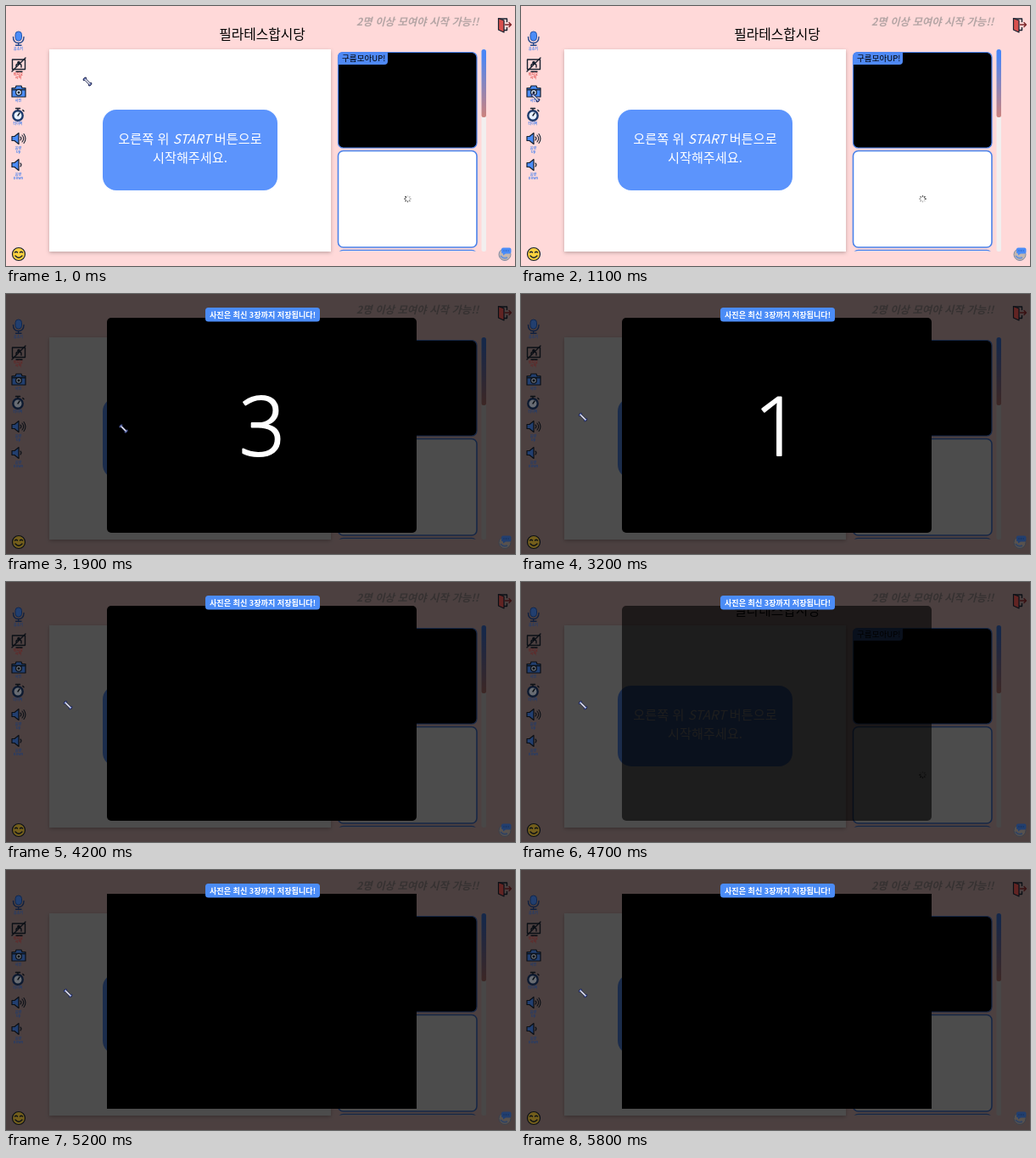
Recreate the animation shown at these times as an HTML page. Size 600 by 306 pixels, loop 6600 ms.

```html
<!DOCTYPE html>
<html lang="ko">
<head>
<meta charset="utf-8">
<style>
  html, body { margin: 0; width: 100%; height: 100%; overflow: hidden; background: #ffd9d9; }
  svg { display: block; width: 100%; height: 100%; }
  text { font-family: "Noto Sans CJK KR", "Noto Sans CJK", sans-serif; }
  .light, .light text { font-family: "Noto Sans CJK KR Light", "Noto Sans CJK KR", sans-serif; font-weight: 300; }
  .mid { text-anchor: middle; }
  .tiny { font-size: 4px; font-weight: 700; fill: #4b83ee; text-anchor: middle; }
  .red { fill: #e2504f; }
  .line { fill: none; stroke: #17212f; stroke-width: 1.4; stroke-linecap: round; stroke-linejoin: round; }
  .ink { stroke: #17212f; stroke-width: 1.2; stroke-linejoin: round; }
  .blue { fill: #4b8cf7; }
  .card { stroke: #4a82ea; stroke-width: 1.6; }
  #count { font: 300 95px "Open Sans", "Noto Sans", sans-serif; fill: #fff; stroke: #fff; stroke-width: 2; stroke-linejoin: round; }
</style>
</head>
<body>
<svg viewBox="0 0 600 306">
  <defs>
    <linearGradient id="thumb" x2="0" y2="1">
      <stop offset=".1" stop-color="#4b86f5"/>
      <stop offset="1" stop-color="#cd827c"/>
    </linearGradient>
    <filter id="shadow" x="-5%" y="-5%" width="110%" height="112%">
      <feDropShadow dx="0" dy="1.5" stdDeviation="2" flood-opacity=".25"/>
    </filter>
    <clipPath id="listClip"><rect x="388" y="50" width="172" height="238.5"/></clipPath>
  </defs>

  <rect width="600" height="306" fill="#ffd9d9"/>
  <text class="light mid" x="302" y="39" font-size="15.8">필라테스합시당</text>
  <text x="413" y="23" font-size="12.4" font-weight="700" font-style="italic" fill="#b5a5a5">2명 이상 모여야 시작 가능!!</text>

  <rect x="51" y="51" width="332" height="238" fill="#fff" filter="url(#shadow)"/>
  <rect x="114" y="122" width="206" height="95" rx="16" fill="#5c94fc"/>
  <g class="light mid" font-size="15.2" fill="#fff">
    <text x="217" y="161.5">오른쪽 위 <tspan font-style="italic">START</tspan> 버튼으로</text>
    <text x="217" y="183.5">시작해주세요.</text>
  </g>

  <g clip-path="url(#listClip)">
    <rect class="card" x="391.5" y="54.5" width="163.5" height="112.5" rx="6" style="stroke-width:1.2"/>
    <path d="M391 69V60q0-6 6-6H450V65q0 4-4 4Z" fill="#4f89f5"/>
    <text x="396" y="65" font-size="9.6">구름모아UP!</text>
    <rect class="card" x="391.5" y="170.5" width="163.5" height="113.5" rx="6" fill="#fff"/>
    <rect class="card" x="391.5" y="287.5" width="163.5" height="113" rx="6" fill="#fff"/>
  </g>
  <g id="spinner" stroke="#222" stroke-width="1.3"></g>
  <rect x="560.5" y="51" width="5.5" height="238" rx="2.5" fill="#f2efef"/>
  <rect x="560.5" y="51" width="5.5" height="80" rx="2.5" fill="url(#thumb)"/>

  <rect id="dim" width="600" height="306" opacity=".7"/>

  <g id="icons">
    <!-- microphone -->
    <rect class="blue" x="11" y="30" width="7.5" height="11" rx="3.7" stroke="#2457ad"/>
    <path class="line" style="stroke:#24488c" d="M8.5 36.5q0 7 6.200 7T21 36.500M14.700 43.500v3M11.500 46.300h6.500"/>
    <text class="tiny" x="14.500" y="51.500">음소거</text>
    <!-- video off -->
    <rect class="line" x="7.500" y="63" width="15" height="11.500"/>
    <path class="line" d="M7 77L23 61M12 77.200h7M12 72v-2q0-2 3-2t3 2v2"/>
    <circle cx="15" cy="66.500" r="1.800" fill="#17212f"/>
    <text class="tiny red" x="14.500" y="81.500">비디오</text>
    <text class="tiny red" x="14.500" y="86">시작</text>
    <!-- camera -->
    <path class="blue ink" d="M7 96.500h4l1-2.500h6l1 2.500h4V107H7Z"/>
    <path class="line" d="M7.500 98.500h15"/>
    <circle class="ink" cx="15" cy="101.700" r="3.400" fill="#dbe9ff"/>
    <circle cx="15" cy="101.700" r="1.500" fill="#17212f"/>
    <text class="tiny" x="14.500" y="113">사진</text>
    <!-- stopwatch -->
    <circle cx="14" cy="129" r="5.700" fill="#e8f1ff" stroke="#1d3a6b" stroke-width="2.400"/>
    <path class="line" d="M14 129l2-3M11.500 120.500h5M14 121v1.500M19.800 122.500l1.200 1.200"/>
    <text class="tiny" x="14" y="140">타이머</text>
    <!-- volume -->
    <path id="speaker" class="blue ink" d="M7 153.500h3l5-4v13l-5-4H7Z"/>
    <path class="line" style="stroke-width:1.100" d="M17 154q2 2 0 4M19 152q3.500 4 0 8M21 150.500q4 5.500 0 11"/>
    <text class="tiny" x="14.500" y="169">음량</text>
    <text class="tiny" x="14.500" y="173">Up</text>
    <use href="#speaker" y="31"/>
    <path class="line" style="stroke-width:1.100" d="M17 185q2 2 0 4"/>
    <text class="tiny" x="14.500" y="199.500">음량</text>
    <text class="tiny" x="14.500" y="204">Down</text>
    <!-- smile -->
    <circle class="ink" cx="15" cy="292" r="7.500" fill="#ffd23f"/>
    <path class="line" d="M10.500 290q1.500-1.500 3 0M16.500 290q1.500-1.500 3 0M11 294q4 4.500 8 0"/>
    <!-- exit -->
    <path class="line" d="M580.500 15h10v3.500M590.500 25.500v3h-4"/>
    <path class="ink" fill="#d9504e" d="M580.500 14.500l6.500 2.500V31l-6.500-3Z"/>
    <path class="line" style="stroke:#7d2529" d="M588.500 22h7M593 19.500l2.500 2.500-2.500 2.500"/>
    <!-- chat -->
    <circle cx="588" cy="292.500" r="7" fill="#c4b6ae" stroke="#7f8ca5"/>
    <path class="blue" d="M586 284.500h7.500q2 0 2 2v3q0 2-2 2H589l-3 2v-2q-2 0-2-2v-3q0-2 2-2"/>
    <path d="M586.500 288h6" stroke="#1c4fa8" stroke-dasharray="1 1.500"/>
    <path d="M583 294q3 4 8 2" fill="none" stroke="#6d95d8" stroke-width="2"/>
  </g>

  <g id="modal">
    <rect id="panel" x="119" width="365"/>
    <text id="count" class="mid" x="302" y="190"></text>
    <rect class="blue" x="235" y="16" width="135" height="16.500" rx="3.500"/>
    <text class="mid" x="302.500" y="27.500" font-size="9.100" font-weight="700" fill="#fff">사진은 최신 3장까지 저장됩니다!</text>
  </g>

  <g id="cursor" stroke-linecap="round">
    <path d="M-3.500-3.500L3.500 3.500" stroke="#252b55" stroke-width="3.200"/>
    <path d="M-4.500-2.500L-2.500-4.500M2.500 4.500L4.500 2.500" stroke="#252b55" stroke-width="3"/>
    <path d="M-4.200-2.700L-2.700-4.200M2.700 4.200L4.200 2.700" stroke="#8fa4e8" stroke-width="1.200"/>
    <path d="M-2.500-2.500L2.500 2.500" stroke="#f4f4fa" stroke-width="1.600"/>
  </g>
</svg>
<script>
const LOOP = 6600, STEP = 100;
const $ = id => document.getElementById(id);

// Cursor stops: [ms, x, y]
const path = [
  [0, 96, 89], [700, 20, 106], [1000, 17, 108], [1200, 17, 108],
  [1400, 71, 137], [1600, 138, 158], [1800, 138.5, 158.5],
  [2900, 138.5, 158.5], [3100, 73, 145], [LOOP, 73, 145]
];

function cursorAt(t) {
  const i = path.findIndex(stop => stop[0] > t);
  const [t0, x0, y0] = path[i - 1], [t1, x1, y1] = path[i];
  const k = (t - t0) / (t1 - t0);
  return [x0 + (x1 - x0) * k, y0 + (y1 - y0) * k];
}

for (let i = 0; i < 8; i++) {
  $("spinner").innerHTML += `<path d="M0-2.200V-4.200" transform="rotate(${i * 45})" opacity="${0.2 + i * 0.11}"/>`;
}

function draw(t) {
  const open = t >= 1200, fading = t >= 4200 && t < 5200;
  const tall = t >= 1200 && t < 1300, square = tall || t >= 5200;
  for (const id of ["dim", "modal"]) $(id).style.display = open ? "" : "none";
  $("icons").style.filter = open ? "brightness(.45)" : "none";

  const panel = $("panel");
  panel.setAttribute("y", tall ? 0 : 28);
  panel.setAttribute("height", tall ? 306 : 253);
  panel.setAttribute("rx", square ? 0 : 5);
  panel.setAttribute("opacity", fading ? 1 - (t - 4200) * 0.00077 : 1);

  $("count").textContent = open && t < 4200 ? 3 - Math.floor((t - 1200) / 1000) : "";
  $("spinner").setAttribute("transform", `translate(473.500 227) rotate(${t / STEP * 45})`);
  $("cursor").setAttribute("transform", `translate(${cursorAt(t)}) scale(.9)`);
}

function tick() {
  draw(Math.floor(performance.now() % LOOP / STEP) * STEP);
  requestAnimationFrame(tick);
}
tick();
</script>
</body>
</html>
```
